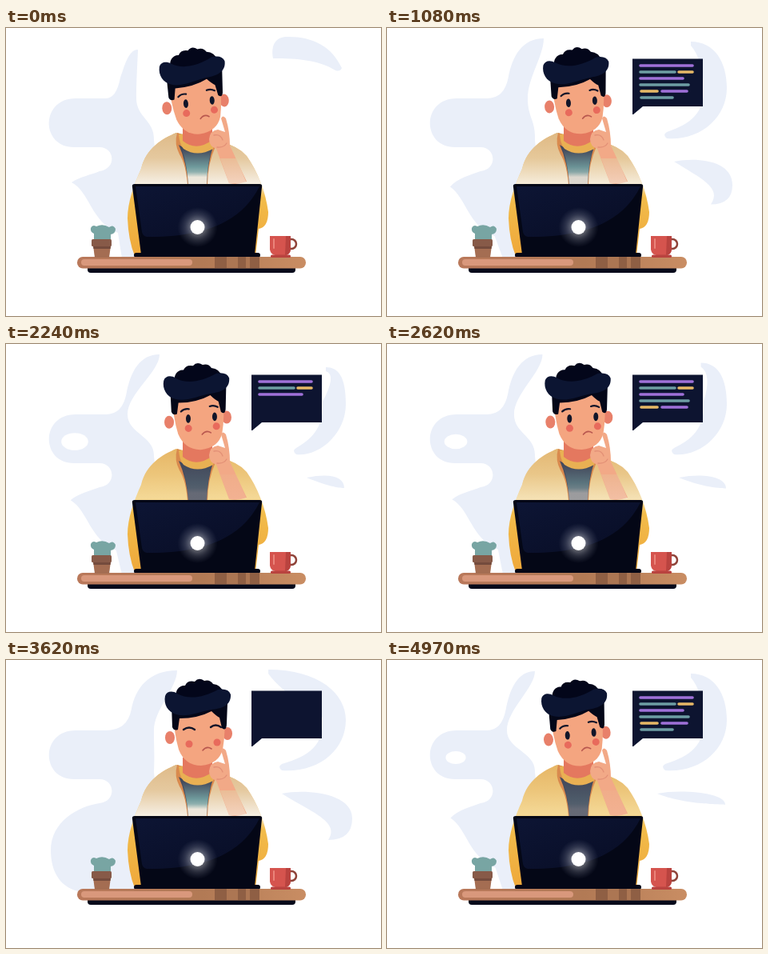
Recreate the animation shown at these times as an HTML page. Size 469x360 px, loop 5100 ms.

```html
<!DOCTYPE html>
<html lang="en">
<head>
<meta charset="utf-8">
<style>
  html, body { margin: 0; width: 100%; height: 100%; overflow: hidden; background: #fff; }
  svg { display: block; width: 469px; height: 360px; }
</style>
</head>
<body>
<svg viewBox="0 0 469 360" fill="none" stroke-linecap="round" stroke-linejoin="round">
  <defs>
    <linearGradient id="coat" gradientUnits="userSpaceOnUse" x1="0" y1="130" x2="0" y2="285">
      <stop stop-color="#e8b45c"/><stop offset=".4" stop-color="#f4d384"/>
      <stop offset=".5" stop-color="#f2bd4c"/><stop offset="1" stop-color="#efa83a"/>
    </linearGradient>
    <linearGradient id="haze" gradientUnits="userSpaceOnUse" x1="0" y1="130" x2="0" y2="212">
      <stop stop-color="#deb987"/><stop offset=".4" stop-color="#e5c99f"/>
      <stop offset=".78" stop-color="#f5eee2"/><stop offset="1" stop-color="#f5d9a0" stop-opacity="0"/>
    </linearGradient>
    <linearGradient id="shirtGlow" gradientUnits="userSpaceOnUse" x1="0" y1="152" x2="0" y2="195">
      <stop stop-color="#6f9a9c" stop-opacity="0"/><stop offset=".5" stop-color="#6f9a9c"/>
      <stop offset=".65" stop-color="#8fb0ae"/><stop offset=".8" stop-color="#ece6da"/>
    </linearGradient>
    <linearGradient id="lid" x1="0" y1="0" x2="1" y2="1">
      <stop stop-color="#0d1534"/><stop offset="1" stop-color="#080d25"/>
    </linearGradient>
    <radialGradient id="halo">
      <stop offset=".3" stop-color="#fff" stop-opacity=".42"/>
      <stop offset=".65" stop-color="#a5a9b8" stop-opacity=".22"/>
      <stop offset="1" stop-color="#8088a0" stop-opacity="0"/>
    </radialGradient>
    <linearGradient id="wood">
      <stop stop-color="#b9785a"/><stop offset=".55" stop-color="#b27a55"/><stop offset="1" stop-color="#c98d63"/>
    </linearGradient>
    <path id="torso" d="M213 131C196 138 175 150 169 176C160 196 152 218 152 238Q153 265 161 285H312L316 251Q328 249 328 230C325 205 314 178 301 160Q290 147 268 143Z"/>
  </defs>

  <g fill="#eaeff9">
    <path id="leftBlob"/>
    <path id="rightBlob"/>
    <path id="leaf"/>
    <path id="arc" d="M334 38C331 20 338 12 350 11C382 10 407 22 420 50Q418 55 412 53C391 40 365 38 334 38Z"/>
  </g>
  <ellipse id="hole" cx="86" cy="122" fill="#fff"/>

  <g id="bubble">
    <path fill="#0d1430" d="M307 38.500H395V98H320L308 108H307Z"/>
    <g id="code" stroke-width="3.600"></g>
  </g>

  <use href="#torso" fill="url(#coat)"/>
  <use id="hazeLayer" href="#torso" fill="url(#haze)"/>
  <path fill="#d98a4e" d="M214 131Q210 145 217 158Q225 170 227 196H252Q252 170 262 148Z"/>
  <path fill="#444a5c" d="M216 146Q236 160 259 148Q252 170 251 196H228Q226 168 216 146Z"/>
  <path id="shirtLight" fill="url(#shirtGlow)" d="M220 152H257Q252 170 251 196H228Q226 168 220 152Z"/>
  <path fill="#e9b053" d="M216 133Q217 145 222 151Q239 162 259 151L264 133Z"/>
  <path fill="#e4785f" d="M221 122V141Q238 155 258 140V120Z"/>

  <g id="head">
    <ellipse cx="205" cy="97" rx="6" ry="8" fill="#e8806a"/>
    <ellipse cx="277" cy="92" rx="6" ry="8" fill="#e8806a"/>
    <path fill="#f4a580" d="M209 62Q210 92 216 112Q224 132 244 132Q266 130 271 112Q275 90 273 58Z"/>
    <path fill="#040718" d="M207 56L208 84Q210 89 215 87L217 73Q240 73 257 64Q263 70 267 72L270 85Q276 90 276 79L277 54Z"/>
    <path fill="#03061a" d="M213 46C211 38 217 31 224 32Q227 25 236 27Q241 21 248 26Q255 24 259 30Q269 31 272 41L262 54H220Z"/>
    <path fill="#0c1532" d="M199 45C201 39 208 38 214 42C228 50 247 47 265 37Q278 35 281 43C282 57 269 61 257 62C241 65 226 72 213 68C202 65 197 55 199 45Z"/>
    <g fill="#e86a5c">
      <circle cx="229" cy="105" r="4.5"/><circle cx="264" cy="103" r="4.5"/>
    </g>
    <g id="eyesOpen" fill="#111529">
      <ellipse cx="229" cy="93" rx="3" ry="5.3"/><ellipse cx="262" cy="91" rx="3" ry="5.3"/>
      <path stroke="#111529" stroke-width="2.200" fill="none" d="M220 84Q224 80 230 81M256 78Q261 76 266 79"/>
    </g>
    <path id="eyesShut" stroke="#111529" stroke-width="2.400" d="M222 87Q229 82 236 87M256 84Q262 79 269 84"/>
    <path stroke="#b9584f" stroke-width="1.600" d="M246 113Q251 107 257 111"/>
  </g>

  <path fill="#f2a987" d="M254 139Q255 128 265 127L274 130L269 113Q271 108 275 113Q280 130 280 147L301 192Q290 196 279 194L263 151Q254 148 254 139Z"/>
  <path stroke="#e28f76" stroke-width="1.300" d="M260 134Q268 132 271 140M264 149Q272 150 276 144"/>
  <path id="armLight" fill="url(#haze)" d="M268 163H288L301 194H279Z"/>

  <path fill="#040716" d="M161 195H317Q321 195 320 199L311 283H169L158 199Q157 195 161 195Z"/>
  <path fill="url(#lid)" d="M162 198H317C300 232 264 262 176 261Q171 260 170 255Z"/>
  <rect x="160" y="281" width="158" height="6" rx="3" fill="#040716"/>
  <circle cx="239.500" cy="249" r="25" fill="url(#halo)"/>
  <circle cx="239.500" cy="249" r="9" fill="#fff"/>

  <rect x="102" y="297" width="260" height="9" rx="4" fill="#070a1b"/>
  <rect x="89" y="286" width="286" height="14.500" rx="7" fill="url(#wood)"/>
  <rect x="94" y="289" width="139" height="8" rx="4" fill="#d9987c"/>
  <path fill="#8f5f44" d="M261 286h15v14h-15zM290 286h10v14h-10zM305 286h12v14h-12z"/>
  <path fill="#ac7653" d="M276 286h14v14h-14zM300 286h5v14h-5z"/>

  <path fill="#78a5a3" d="M110 265V257Q105 255 106 250Q108 245 113 248Q121 244 129 249Q134 245 137 251Q137 257 131 258V265Z"/>
  <path fill="#a46d52" d="M109 272H131L129 287H111Z"/>
  <rect x="107" y="264" width="25" height="9" rx="1.500" fill="#875a48"/>
  <path fill="#744b3d" d="M109 273H131L130.500 276H109.500Z"/>

  <circle cx="357" cy="270" r="6" stroke="#8f4339" stroke-width="2.500"/>
  <path fill="#d5544e" d="M330 260H356V277Q355 284 349 284H337Q331 283 330 277Z"/>
  <path fill="#b9433f" d="M350 260H356V277Q355 284 349 284Z"/>
  <path stroke="#ea847a" stroke-width="2" d="M335 264V275"/>
  <rect x="331" y="283.500" width="25" height="3.500" rx="1.500" fill="#b9433f"/>
</svg>
<script>
const LOOP = 5100, START = 230, TYPING = 1650;
const $ = id => document.getElementById(id);
const clamp = x => Math.min(1, Math.max(0, x));
const mix = (a, b, k) => a + (b - a) * k;
const set = (id, attrs) => { for (const k in attrs) $(id).setAttribute(k, attrs[k]); };

// time, lean, haze, tip x, tip y, stem x, hole, lobe, crescent x, y, end x, leaf x, right, size
const poses = [
  [230, 1, 1, 165, 27, 163, 0, 0, 328, 14, 350, 370, 424, 0],
  [1080, .5, .9, 196, 13, 176, 0, .12, 380, 17, 350, 359, 432, .9],
  [2240, .25, .2, 192, 13, 152, 1.2, .05, 400, 29, 363, 376, 423, 0],
  [3010, .1, .85, 197, 13, 166, .85, 0, 385, 18, 355, 354, 425, .02],
  [3620, 0, 1, 214, 13, 185, 0, 1, 328, 12, 345, 345, 433, 1],
  [4320, 0, .8, 200, 12, 178, 0, 0, 380, 17, 358, 354, 431, .25],
  [4970, .8, .2, 185, 14, 150, .9, .1, 380, 17, 348, 338, 423, .02]
];

// row, from x, to x, colour
const segments = [
  [0, 316, 383, "#9f70d8"], [1, 316, 361, "#6d9da3"], [1, 364, 383, "#e6b866"],
  [2, 316, 371, "#9f70d8"], [3, 316, 378, "#6d9da3"], [4, 317, 339, "#e6b866"],
  [4, 343, 376, "#9f70d8"], [5, 317, 358, "#6d9da3"]
];
const lines = segments.map(([row, x1, x2, stroke]) => {
  const line = document.createElementNS("http://www.w3.org/2000/svg", "path");
  line.setAttribute("stroke", stroke);
  line.setAttribute("d", `M${x1 + 1} ${47 + row * 8}H${x2 - 1}`);
  $("code").append(line);
  return { line, start: 172 + 120 * row + 4 * row * row };
});

function poseAt(t) {
  const i = poses.findIndex(p => p[0] > t);
  if (i === 0) return poses[0];
  if (i < 0) return poses[poses.length - 1];
  const a = poses[i - 1], b = poses[i], k = (t - a[0]) / (b[0] - a[0]);
  return a.map((v, j) => mix(v, b[j], k));
}

function draw(t) {
  const [, lean, haze, tx, ty, rx, hole, lobe, sx, sy, ex, ax, bx, size] = poseAt(t);
  const stem = 146 + (tx - 165) * .28;
  const m = (a, b) => mix(a, b, lobe);

  set("leftBlob", { d: `M${tx} ${ty}C${mix(tx, stem, .65)} ${ty} ${stem + 2} ${ty + 22} ${stem - 3} 62
    Q${stem - 8} 88 125 88H87C43 88 43 149 85 149H117C136 149 139 176 117 179
    C${m(108, 90)} 183 ${m(92, 56)} ${m(186, 202)} ${m(82, 56)} ${m(193, 238)}
    C${m(105, 56)} ${m(205, 265)} ${m(106, 68)} ${m(242, 286)} ${m(140, 95)} ${m(256, 290)}
    L145 288H200L185 140C186 115 ${rx} 112 ${rx} 88C${rx} 62 ${tx} 35 ${tx} ${ty}Z` });
  set("rightBlob", { d: `M${sx} ${sy}C${mix(sx, 425, .65)} ${sy} 425 42 425 75
    C425 112 392 141 ${ex} 138Q${ex - 6} 133 ${ex} 130C380 120 398 106 396 72Q${sx + 14} 38 ${sx} ${sy + 5}Z` });
  set("leaf", { d: `M${ax} 167C${ax + 30} 161 ${bx} 166 ${bx} ${180 + 18 * size}
    Q${bx} ${180 + 45 * size} ${bx - 30 * size} ${180 + 45 * size}
    C${bx - 14 * size} ${180 + 22 * size} ${ax + 34} ${181 + 8 * size} ${ax} 167Z` });
  set("hole", { rx: 14 * hole, ry: 9 * hole });

  const started = t >= START;
  $("arc").style.display = started ? "none" : "";
  $("rightBlob").style.display = $("leaf").style.display = started ? "" : "none";

  const phase = Math.max(0, t - 150) % TYPING;
  const pop = clamp((phase - 40) / 80);
  $("bubble").style.display = started && pop ? "" : "none";
  set("bubble", { transform: `translate(308 108) scale(${pop}) translate(-308 -108)` });
  for (const { line, start } of lines) line.style.opacity = clamp((phase - start) / 10);

  const shut = started && phase > 120 && phase < 250;
  $("eyesOpen").style.display = shut ? "none" : "";
  $("eyesShut").style.display = shut ? "" : "none";

  set("head", { transform: `translate(${-1.3 * lean} ${.8 * lean}) rotate(${-3.8 * lean} 240 135)` });
  set("hazeLayer", { opacity: haze });
  set("shirtLight", { opacity: haze });
  set("armLight", { opacity: haze * .6 });
}

function tick() {
  draw(performance.now() % LOOP);
  requestAnimationFrame(tick);
}
tick();
</script>
</body>
</html>
```
